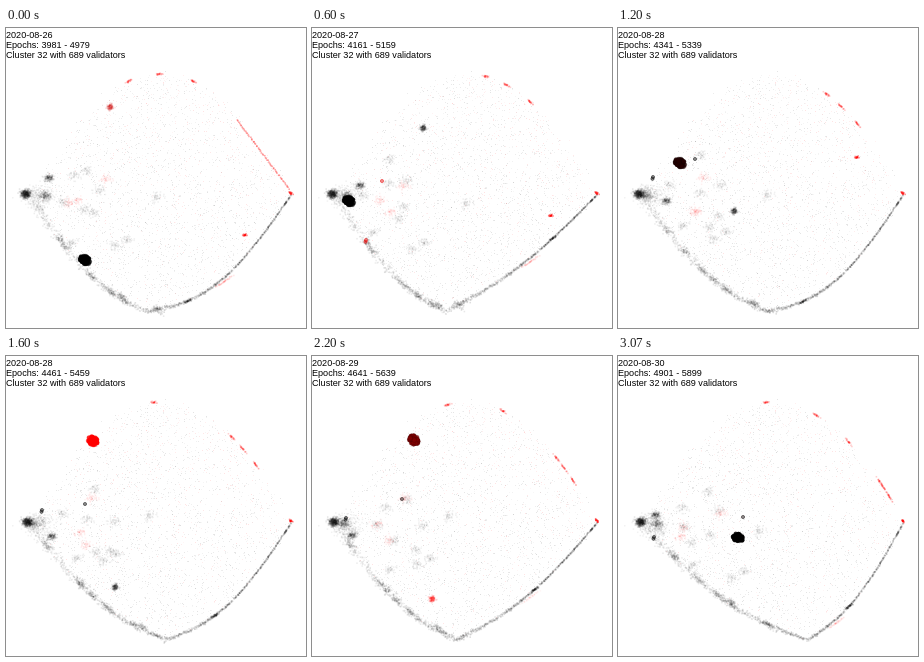
Animation, 300 px wide and 300 px high, one loop 3140 ms. Source, as an HTML page with a canvas:

```html
<!DOCTYPE html>
<html lang="en">
<head>
<meta charset="utf-8">
<title>Validator clusters</title>
<style>
html, body { margin: 0; width: 100%; height: 100%; overflow: hidden; background: #fff; }
canvas { display: block; }
pre { position: absolute; left: 0; top: 2px; margin: 0; color: #000;
  font: 9.1px/10px "Liberation Sans", Arial, sans-serif; }
</style>
</head>
<body>
<canvas id="plot" width="300" height="300"></canvas>
<pre id="label"></pre>
<script>
const ctx = plot.getContext('2d');
const LOOP = 3140, LAST = 46;
const GENESIS = Date.UTC(2020, 7, 4, 13, 0, 8), EPOCH_MS = 384000;
const LEFT = 22, RIGHT = 286, CORNER_Y = 166;

// Key points of the free-moving groups, at these steps
const KEYS = [0, 9, 18, 24, 33, 39, 46];
const BOTTOM_X = [140, 134, 150, 160, 145, 135, 190];
const MAIN = [[79, 232], [37, 173], [62, 135], [87, 85], [102, 84], [120, 89], [120, 182]];
const ROVER = [[104, 79], [111, 100], [116, 183], [109, 231], [120, 243], [121, 167], [121, 182]];
const SINGLE = [[77, 231], [70, 153], [77, 131], [79, 148], [90, 143], [115, 145], [125, 161]];
const PAIR = [[80, 232], [54, 212], [35, 149], [36, 154], [34, 162], [36, 171], [36, 181]];
const STREAK_BIRTHS = [-12, -5, 0, 20, 31, 42];

let seed, k;

function rand() {
  seed = (seed + 0x6D2B79F5) | 0;
  let t = Math.imul(seed ^ (seed >>> 15), 1 | seed);
  t = (t + Math.imul(t ^ (t >>> 7), 61 | t)) ^ t;
  return ((t ^ (t >>> 14)) >>> 0) / 4294967296;
}
const gauss = () => Math.sqrt(-2 * Math.log(1 - rand())) * Math.cos(2 * Math.PI * rand());
const clamp = v => Math.max(0, Math.min(1, v));
const ink = (red, a) => `rgba(${Math.round(255 * clamp(red))},0,0,${clamp(a)})`;
const wave = (period, shift = 0) => Math.cos(2 * Math.PI * (k - shift) / period);
const bump = (center, width) => Math.exp(-(((k - center) / width) ** 2));
const dot = (x, y) => ctx.fillRect(x - 0.8, y - 0.8, 1.6, 1.6);

// Smooth interpolation of one value per key
function spline(vals) {
  const end = KEYS.length - 1;
  let i = 0;
  while (i < end - 1 && k >= KEYS[i + 1]) i++;
  const slope = j => {
    const a = Math.max(0, j - 1), b = Math.min(end, j + 1);
    return (vals[b] - vals[a]) / (KEYS[b] - KEYS[a]);
  };
  const h = KEYS[i + 1] - KEYS[i], s = (k - KEYS[i]) / h, r = 1 - s;
  return vals[i] * r * r * (1 + 2 * s) + vals[i + 1] * s * s * (3 - 2 * s) +
    h * s * r * (slope(i) * r - slope(i + 1) * s);
}
const along = path => [0, 1].map(axis => spline(path.map(p => p[axis])));

// Upper and lower boundary of the plot
const dome = x => 46 + 120 * ((x - 155) / 131) ** 2;
function rim(x) {
  const low = spline(BOTTOM_X), left = x < low;
  const s = clamp(left ? (x - LEFT) / (low - LEFT) : (RIGHT - x) / (RIGHT - low));
  const bulge = left ? 19 : 20 + 9 * wave(20);
  return CORNER_Y + (284 - CORNER_Y) * s + bulge * Math.sin(Math.PI * s);
}

function cloud(n, x, y, sx, sy, alpha, red = 0, tilt = 0) {
  ctx.fillStyle = ink(red, alpha);
  for (let i = 0; i < n; i++) {
    const dx = gauss() * sx;
    dot(x + dx, y + gauss() * sy + dx * tilt);
  }
}

function drawNoise() {
  for (let i = 0; i < 2600; i++) {
    const x = 154 + 132 * Math.asin(2 * rand() - 1) * 2 / Math.PI, v = rand();
    const top = dome(x), y = rim(x) + (top - rim(x)) * v;
    const warm = rand() < 0.1 + 0.5 * v * (x / 300);
    ctx.fillStyle = ink(warm ? 1 : 0, 0.03 + 0.08 * rand());
    ctx.fillRect(Math.round(x + gauss() * 2), Math.round(y + gauss() * 2), 1, 1);
  }
}

function drawRim() {
  for (let i = 0; i < 1000; i++) {
    const x = LEFT + (RIGHT - LEFT) * rand(), u = (x - LEFT) / (RIGHT - LEFT);
    const spread = 0.3 + 2.6 * (1 - u) ** 1.7;
    ctx.fillStyle = ink(0, 0.06 + 0.16 * u * rand());
    dot(x + gauss() * spread, rim(x) + gauss() * spread);
  }
  // Opening red trail down to the right corner
  ctx.fillStyle = ink(1, 0.35 * (1 - k / 5));
  for (let i = 0; i < 60; i++) {
    const s = i / 60;
    dot(231 + 53 * s + gauss() * 0.3, 92 + 70 * s + gauss() * 0.3);
  }
}

function drawHaze() {
  for (let i = 0; i < 14; i++) {
    const x = 84 + 22 * gauss(), y = 172 + 24 * gauss(), phase = 56 * rand();
    cloud(45, x + 9 * wave(56, phase), y + 9 * wave(40, phase), 3, 2.3, 0.055, i % 6 ? 0 : 1);
  }
  for (let i = 0; i < 7; i++) {
    const x = 50 + 15 * i + 12 * wave(50, 56 * rand());
    cloud(40, x, rim(x) - 4 * rand(), 2.6, 1.8, 0.09, 0, 0.5);
  }
}

function drawLeft() {
  cloud(220, 33, 168, 7, 5, 0.05);
  cloud(420, 20 + 3 * k / LAST, 166, 2.6, 2.1, 0.1);
  cloud(170, 33 + 7 * wave(46), 168, 2.9, 2.4, 0.07);
  cloud(160, 43 + 6 * wave(56, 14), 166 - 16 * wave(56), 2.2, 2, 0.08);
}

function drawStreaks() {
  for (const birth of STREAK_BIRTHS) {
    const x = RIGHT - 163 * Math.exp((birth - k) / 24);
    if (x < 115) continue;
    const slope = 240 * (x - 155) / 131 ** 2;
    cloud(22, x, dome(x), 1.4, 0.5, 0.18, 1, slope);
  }
  cloud(22, 239, 207 - 0.24 * k * k, 1, 0.5, 0.3 * clamp((22 - k) / 3), 1, -0.3);
  cloud(14, 285, CORNER_Y - 1, 0.8, 0.6, 0.4, 1, 0.5);

  const tickX = 212 - 30 * wave(19.5);
  cloud(40, tickX, rim(tickX), 2, 0.6, 0.15, 0, -0.6);
  cloud(40, 218, rim(218) + 4, 5, 0.5, 0.12 * wave(36, 4), 1, -0.7);
}

function drawMain() {
  const [x, y] = along(MAIN), red = 1.35 * bump(27, 6);
  ctx.fillStyle = ink(red, 0.85);
  ctx.strokeStyle = ink(red > 0.8 ? 1 : red * 0.5, 0.4);
  ctx.lineWidth = 0.6;
  for (let i = 0; i < 50; i++) {
    const a = rand() * 2 * Math.PI, r = Math.sqrt(rand()), dx = Math.cos(a) * r * 4.7;
    ctx.beginPath();
    ctx.arc(x + dx, y + Math.sin(a) * r * 4.3 + dx * 0.2, 2.3, 0, 7);
    ctx.fill();
    ctx.stroke();
  }
}

function ring(x, y, red) {
  ctx.beginPath();
  ctx.arc(x, y, 1.6, 0, 7);
  ctx.fillStyle = ink(red, 0.45);
  ctx.strokeStyle = ink(red, 0.6);
  ctx.lineWidth = 0.8;
  ctx.fill();
  ctx.stroke();
}

function draw() {
  seed = 32;
  ctx.clearRect(0, 0, 300, 300);
  drawNoise();
  drawRim();
  drawHaze();
  drawLeft();
  drawStreaks();
  cloud(130, ...along(ROVER), 1.7, 1.5, 0.1, 0.8 * bump(0, 5) + 1.3 * bump(36, 6));
  drawMain();

  const flush = bump(9, 4);
  ring(...along(SINGLE), 0.9 * (flush + bump(39, 4)));
  const [x, y] = along(PAIR);
  ring(x, y, 0.9 * flush);
  ring(x - 0.5, y + 1.8, 0.9 * flush);

  const first = 3981 + 20 * k, last = first + 998;
  const day = new Date(GENESIS + last * EPOCH_MS).toISOString().slice(0, 10);
  label.textContent = `${day}\nEpochs: ${first} - ${last}\nCluster 32 with 689 validators`;
}

const start = performance.now();
function tick() {
  const t = Math.max(0, performance.now() - start) % LOOP;
  const step = Math.min(LAST, Math.floor((t + 4) * 0.015));
  if (step !== k) {
    k = step;
    draw();
  }
  requestAnimationFrame(tick);
}
tick();
</script>
</body>
</html>
```
